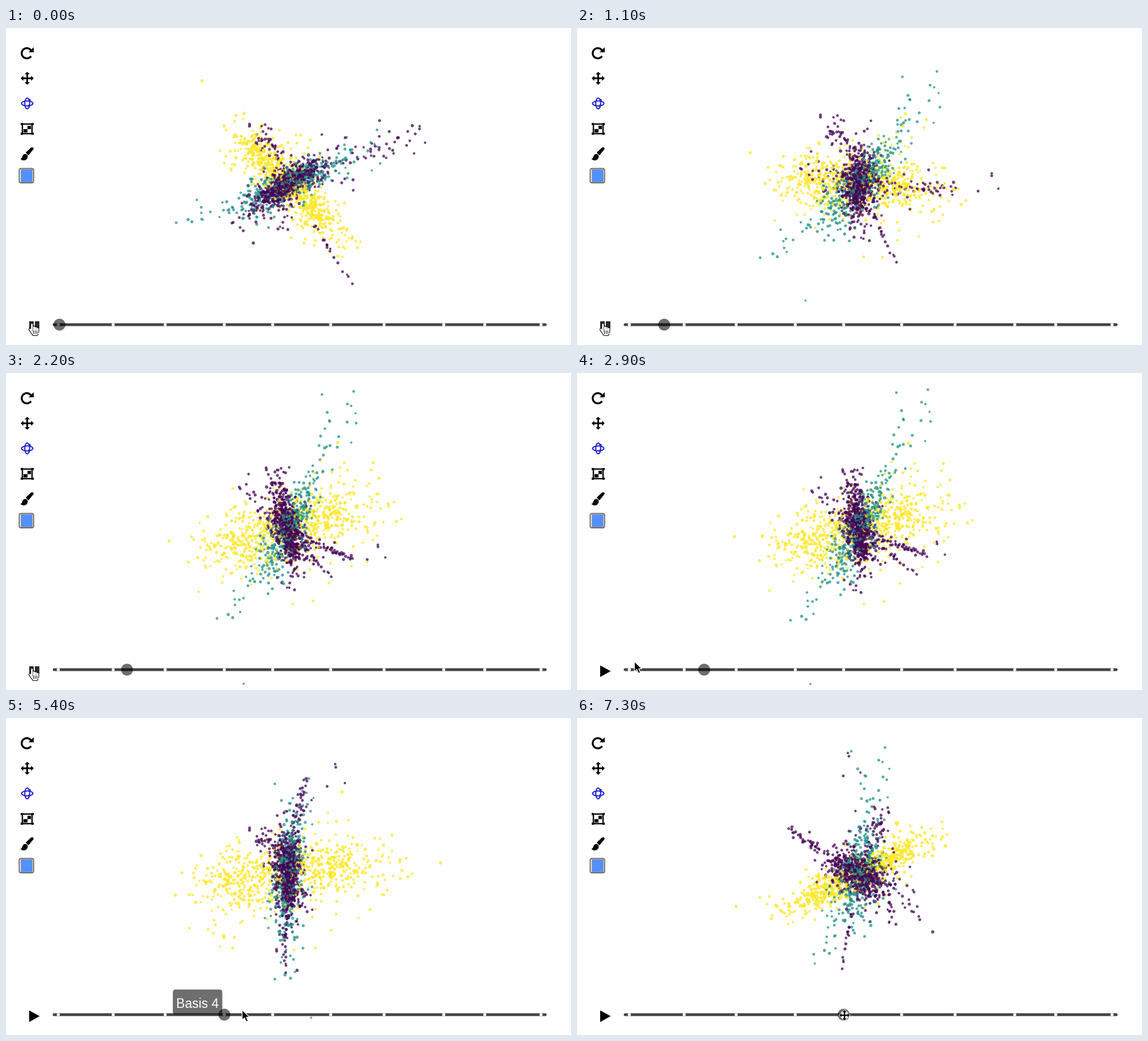
A matplotlib script for the animation above (8 s loop, 999 by 561 pixels).

```python
import numpy as np
import matplotlib.pyplot as plt
from matplotlib.animation import FuncAnimation
from matplotlib.patches import Circle, Ellipse, FancyBboxPatch, PathPatch, Polygon, Rectangle
from matplotlib.path import Path

W, H, DPI = 999, 561, 64
PT = 72 / DPI  # points per pixel
FRAMES, INTERVAL = 80, 100
PURPLE, TEAL, YELLOW = "#440154", "#21918c", "#fde725"
CENTER = np.array([498, 276])
STOPS = [92, 189, 281, 385.5, 471, 573.5, 668, 773.5, 846, 945.5]
RAIL = 524.5
BASIS_2, PAUSE, CLICK_1, LEAVE, CLICK_2 = 18, 24, 49, 54, 70
ARC = np.radians(50)  # angle between the first two projections

rng = np.random.default_rng(7)
fig = plt.figure(figsize=(W / DPI, H / DPI), dpi=DPI, facecolor="white")
ax = fig.add_axes([0, 0, 1, 1])
ax.set_xlim(-0.5, W - 0.5)
ax.set_ylim(H - 0.5, -0.5)
ax.axis("off")


# ---- point cloud: a bundle of strands through one centre ----
def scatter_around(reach, width, ends):
    """Points at s * end plus jitter, for each of the five projections."""
    n = len(reach)
    jitter = rng.normal(size=(n, 2)) * rng.lognormal(-0.05, 0.3, (n, 1))
    width = np.broadcast_to(width, 5)[:, None, None]
    return CENTER + reach[:, None] * np.array(ends)[:, None] + jitter * width


def band(color, n, width, *ends, gap=0.0):
    """Reaches both ways from the centre; a gap splits it in two lobes."""
    reach = rng.choice([-1, 1], n) * rng.normal(gap, 1 - gap / 2, n)
    return color, scatter_around(reach, width, ends)


def arm(color, n, width, *ends, near=0.1):
    """Reaches one way and thins out towards its end."""
    reach = near + (1 - near) * rng.random(n) ** 1.4
    return color, scatter_around(reach, width, ends)


# Ends, from the centre: start, basis 2, paused, basis 4, basis 5.
strands = [
    band(YELLOW, 680, (17, 27, 27, 27, 13),
         (-45, -47), (-70, 24), (-70, 20), (-80, 12), (-64, 32), gap=0.85),
    arm(YELLOW, 9, 20, (-125, -60), (-170, 42), (-185, 25), (-150, 125), (-190, 58), near=0.7),
    arm(YELLOW, 1, 0, (-152, -183), (-190, 36), (-220, 13), (270, -20), (-217, 57), near=1),
    arm(YELLOW, 9, 24, (20, -85), (140, -130), (135, -125), (190, -10), (95, -90), near=0.7),

    band(TEAL, 290, (15, 16, 14, 13, 20), (42, -22), (16, -40), (20, -40), (4, -50), (8, -36)),
    arm(TEAL, 45, 13, (157, -70), (99, -225), (118, -235), (25, -150), (35, -210)),
    arm(TEAL, 45, 14, (-178, 70), (-113, 155), (-100, 165), (0, 190), (-58, 145)),
    arm(TEAL, 1, 0, (-121, 58), (-63, 272), (-86, 274), (41, 254), (-78, 158), near=1),

    band(PURPLE, 560, (12, 13, 12, 12, 20), (-27, 17), (13, 28), (4, 29), (2, 31), (17, 8)),
    arm(PURPLE, 75, (17, 5, 5, 7, 6), (217, -88), (108, 69), (114, 44), (30, -165), (-123, -79)),
    arm(PURPLE, 4, 12, (237, -81), (205, 62), (140, 46), (85, -175), (-20, -195), near=0.9),
    arm(PURPLE, 18, 1.6, (114, 179), (24, 94), (102, 81), (-6, 177), (-32, 170), near=0.4),
    arm(PURPLE, 65, 9, (-52, -105), (-42, -114), (-12, -104), (-52, -80), (45, -118)),
    arm(PURPLE, 40, 11, (-88, 70), (-80, -92), (-72, -72), (-6, 140), (115, 68)),
    arm(PURPLE, 30, 12, (-10, 76), (20, 95), (-6, 110), (10, -90), (60, 85)),
]
colors = np.concatenate([[c] * xy.shape[1] for c, xy in strands])
poses = np.concatenate([xy for _, xy in strands], axis=1)
order = np.argsort(rng.random(len(colors)) + 0.18 * (colors != YELLOW))
poses, colors = poses[:, order], colors[order]
sizes = np.clip(rng.normal(4.9, 0.45, len(colors)), 3.6, 6.2)
dots = ax.scatter(*poses[0].T, s=(sizes * PT) ** 2, c=colors, alpha=0.75, linewidths=0, zorder=2)


def pose_weights(f):
    """Turn from the first projection to the second, move on, pause, then jump."""
    w = np.zeros(5)
    if f < BASIS_2:
        u = f / BASIS_2
        w[:2] = np.sin([(1 - u) * ARC, u * ARC]) / np.sin(ARC)
    elif f < CLICK_1:
        u = min((f - BASIS_2) / (PAUSE - BASIS_2), 1)
        w[1:3] = 1 - u, u
    else:
        w[3 if f < CLICK_2 else 4] = 1
    return w


def project(f):
    return CENTER + np.tensordot(pose_weights(f), poses - CENTER, 1)


# ---- drawing helpers ----
def add(patch, z=5):
    patch.set_zorder(z)
    return ax.add_patch(patch)


def stroke(xs, ys, width, color="black", z=5):
    return ax.plot(xs, ys, color=color, lw=width * PT, zorder=z, snap=False,
                   solid_capstyle="round", solid_joinstyle="round")[0]


def poly(points, color="black", z=5, **kw):
    return add(Polygon(points, fc=color, **kw), z)


def box(x, y, w, h, color="black", edge="none", lw=0):
    """Rectangle around its middle."""
    return add(Rectangle((x - w / 2, y - h / 2), w, h, fc=color, ec=edge, lw=lw * PT))


def round_box(x, y, w, h, r, color, z=5, **kw):
    return add(FancyBboxPatch((x - w / 2, y - h / 2), w, h, fc=color,
                              boxstyle=f"round,pad=0,rounding_size={r}", **kw), z)


def four_arrows(x, y, r, t, w, h, **kw):
    part = np.array([(t, -t), (r - h, -t), (r - h, -w), (r, 0), (r - h, w), (r - h, t)])
    turn = np.array([(0, 1), (-1, 0)])
    pts = [part @ np.linalg.matrix_power(turn, k) for k in range(4)]
    return poly(np.vstack(pts) + (x, y), **kw)


# ---- toolbar ----
a = np.radians(np.linspace(45, 318, 60))
ax.plot(36.3 + 9 * np.cos(a), 44.2 + 9 * np.sin(a), color="black", lw=3.4 * PT, zorder=5)
poly([(48, 33.5), (48, 42.3), (39, 42.3)])

four_arrows(37, 88.5, 11.5, 1.5, 4.6, 4.6)

BLUE = "#1f1fd6"
for w, h in ((20, 8.6), (8.6, 19)):
    add(Ellipse((37, 133), w, h, fc="none", ec=BLUE, lw=2 * PT))
poly([(37, 137.3), (41, 134.2), (41, 140.4)], BLUE)
poly([(38.6, 128), (44.4, 128), (41.5, 124.6)], BLUE)

box(37, 178, 17.5, 16.5, "white", "black", 2.4)
for dx in (-1, 1):
    for dy in (-1, 1):
        box(37 + 9.5 * dx, 178 + 8.8 * dy, 4, 4)
    box(37 + 3.3 * dx, 178 - 3 * dx, 6.6, 6)

stroke([40, 46], [219.5, 212.8], 4.6)
poly([(34.3, 220), (44, 210.8), (48.2, 213.5), (39.2, 225)])
add(PathPatch(Path([(25, 231), (29, 231), (27.5, 223), (33, 222.5), (38, 222), (39.5, 228),
                    (36, 231.5), (33, 235), (28, 234.5), (25, 231)], [1] + [4] * 9),
              fc="black", lw=0))

round_box(35.6, 260.8, 25.4, 25.4, 3, "#f0f0f0", ec="#666666", lw=1.9 * PT)
box(35.6, 260.8, 20.5, 22, "#5390ff", "#8a8a8a", 0.7)

# ---- timeline ----
stroke([84.5, 953], [RAIL, RAIL], 5, "#444444", 3)
for x in STOPS:
    add(Circle((x, RAIL), 2.8, fc="white", lw=0), 3.5)
knob = add(Circle((94, RAIL), 10.5, fc="black", alpha=0.57, lw=0), 6)
tip_box = round_box(338.2, 502, 87.5, 44, 5, "black", lw=0)
tip_text = ax.text(338.2, 503.5, "Basis 4", color="white", fontsize=23 * PT, zorder=7,
                   family="Liberation Sans", ha="center", va="center_baseline")

pause = [box(x, 525, 7.6, 13.6, "#2b2b2b") for x in (44.2, 54.4)]
play = poly([(40.5, 517), (59, 527.2), (40.5, 537.5)])

# ---- cursors ----
fingers = [((x, x), (top, 537)) for x, top in ((45.3, 524), (49, 529), (52.3, 530), (55.4, 531.5))]
fingers += [((42, 46.5), (533, 539.5)), ((47, 54.8), (537.5, 537.5)), ((47.8, 54), (541.7, 541.7))]
hand = [stroke(x, y, w, c, z) for w, c, z in ((5.2, "black", 9), (3, "white", 9.1))
        for x, y in fingers]
hand.append(stroke((47, 54.8), (539.7, 539.7), 3.2, "white", 9.1))
hand += [stroke((x, x), (535.5, 540.5), 1, z=9.2) for x in (48, 51, 54)]

ARROW = 1.05 * np.array([(0, 0), (0, 17), (4, 13.4), (6.8, 20), (10, 18.7), (7.2, 12.3), (12.5, 12.3)])
arrow = poly(ARROW, z=9, ec="white", lw=1.3 * PT)


def grip_at(x):
    y = RAIL + 1
    back = poly([(x - 10.5, y), (x, y - 10.5), (x + 10.5, y), (x, y + 10.5)], "white", 9)
    return [back, four_arrows(x, y, 9.3, 1.2, 3.7, 3.8, z=9.1)]


grip_1, grip_2 = grip_at(385.5), grip_at(472.5)

# Key times and places of the arrow tip
TRAIL = np.array([(27, 47, 522), (29, 101, 510), (36, 205, 521), (42, 386, 524), (53, 386, 524),
                  (54, 417, 516), (58, 494, 519), (62, 472, 522), (66, 472, 524)]).T


def show(artists, on):
    for item in artists:
        item.set_visible(on)


def knob_x(f):
    if f < CLICK_1:
        return 94 + 5.43 * min(f, PAUSE)
    return STOPS[3] if f < CLICK_2 else STOPS[4]


def draw(f):
    dots.set_offsets(project(f))
    knob.center = knob_x(f), RAIL
    show(pause, f < PAUSE)
    show([play], f >= PAUSE)

    fade = np.interp(f, [62, 66], [1, 0]) if f >= CLICK_1 else 0
    tip_box.set_alpha(0.57 * fade)
    tip_text.set_alpha(fade)

    first, second = CLICK_1 <= f < LEAVE, f >= CLICK_2
    show(hand, f < 28)
    show(grip_1, first)
    show(grip_2, second)
    show([arrow], f >= 28 and not (first or second))
    arrow.set_xy(ARROW + [np.interp(f, TRAIL[0], v) for v in TRAIL[1:]])
    return []


anim = FuncAnimation(fig, draw, frames=FRAMES, interval=INTERVAL, repeat=True,
                     repeat_delay=0, blit=False)
plt.show()
```
